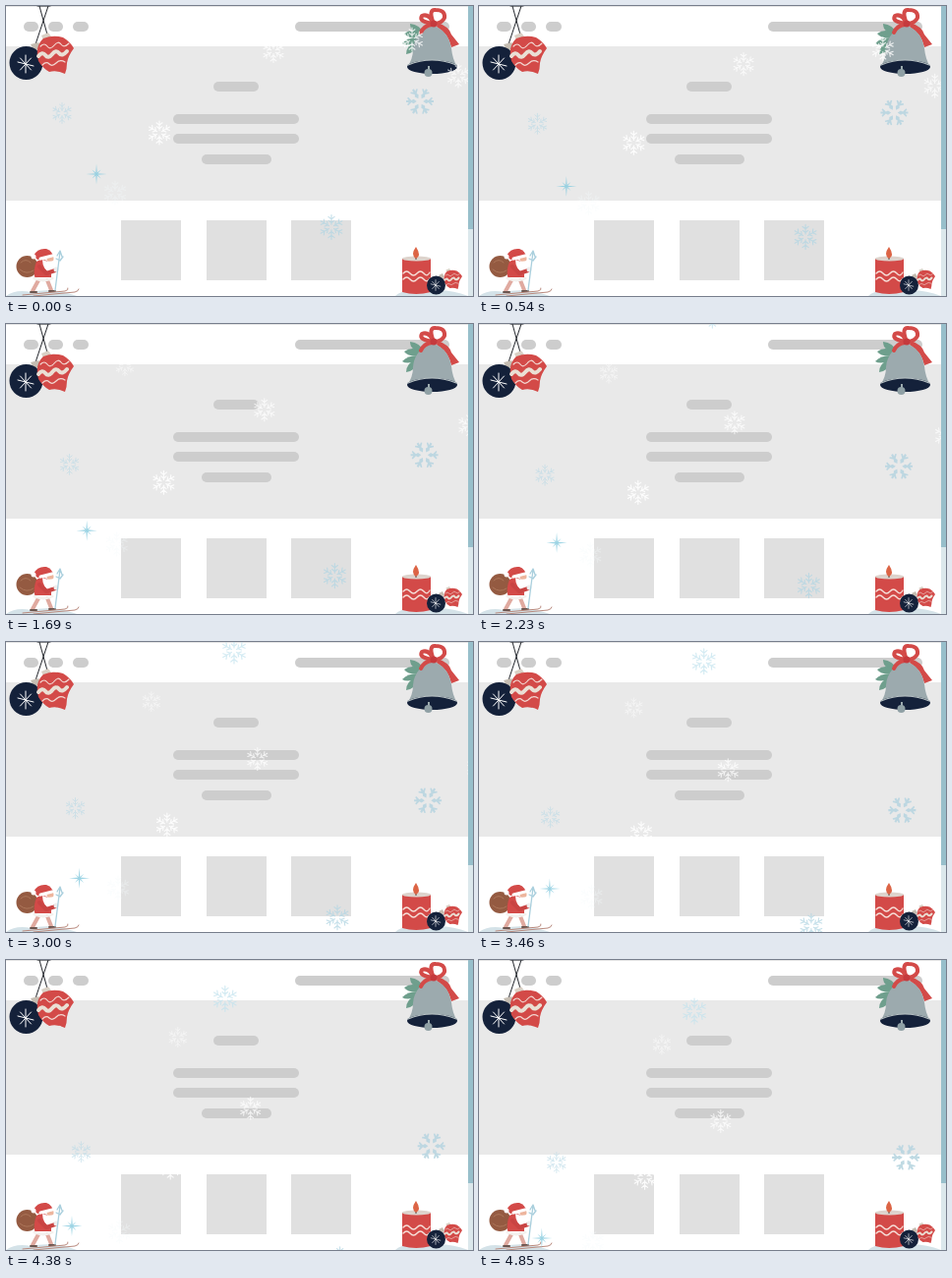
Write an HTML page that moves like this. It is 475 by 295 pixels and loops after 4.92 s.

```html
<!DOCTYPE html>
<html lang="en">
<head>
<meta charset="utf-8">
<title>Winter page</title>
<style>
  html, body { margin: 0; width: 100%; height: 100%; overflow: hidden; background: #fff; }
  svg { display: block; width: 475px; height: 295px; }
  .line { fill: none; stroke-linecap: round; stroke-linejoin: round; }
</style>
</head>
<body>
<svg viewBox="0 0 475 295">
  <defs>
    <path id="arm" d="M0-3V-13M0-4.500l-2.800-2.400M0-4.500l2.800-2.400M0-8.500l-3.200-2.600M0-8.500l3.200-2.600"/>
    <g id="flake" class="line" stroke="currentColor" stroke-width="1.2">
      <use href="#arm"/>
      <use href="#arm" transform="rotate(60)"/>
      <use href="#arm" transform="rotate(120)"/>
      <use href="#arm" transform="rotate(180)"/>
      <use href="#arm" transform="rotate(240)"/>
      <use href="#arm" transform="rotate(300)"/>
    </g>
    <path id="petal" d="M0-3L2-6 1-8 4-11 3-12 1-10.500V-13H-1V-10.500L-3-12-4-11-1-8-2-6Z"/>
    <g id="crystal" fill="currentColor" transform="rotate(30)">
      <use href="#petal"/>
      <use href="#petal" transform="rotate(60)"/>
      <use href="#petal" transform="rotate(120)"/>
      <use href="#petal" transform="rotate(180)"/>
      <use href="#petal" transform="rotate(240)"/>
      <use href="#petal" transform="rotate(300)"/>
    </g>
    <g id="star" fill="currentColor">
      <path d="M0-13L1-1 13 0 1 1 0 13-1 1-13 0-1-1Z"/>
      <path d="M0-8L.8-.8 8 0 .8.8 0 8-.8.8-8 0-.8-.8Z" transform="rotate(45)"/>
    </g>
    <path id="burst" class="line" stroke="#fff" d="M0-9V9M-8-2L8 2M-5.500-6L5.500 6M5.500-6L-5.500 6"/>
    <g id="bauble">
      <path d="M36 30l7-3 3 4-8 4z" fill="#d9d0c5"/>
      <path d="M38 33Q48 29 58 32Q65 36 69 43Q63 51 62 58Q62 64 60 69Q52 65 44 67Q37 63 33 56Q29 41 38 33Z" fill="#d34a48"/>
      <g class="line">
        <path d="M33 51q4-5 7-1t7-1 7-1 8-2" stroke="#eadfd4" stroke-width="4"/>
        <path d="M35 41q4-4 7 0t7-1 7-1 8-1M37 60q4-4 7-1t7-1 9-1" stroke="#f3d8d2" stroke-width="1.200"/>
      </g>
    </g>
  </defs>

  <!-- page wireframe -->
  <rect width="470" height="1" fill="#e6e6e6"/>
  <rect y="41" width="470" height="157" fill="#e9e9e9"/>
  <g fill="#cdcdcd">
    <rect x="18" y="16" width="15" height="10" rx="5"/>
    <rect x="43" y="16" width="15" height="10" rx="5"/>
    <rect x="68" y="16" width="16" height="10" rx="5"/>
    <rect x="294" y="16" width="157" height="10" rx="5"/>
    <rect x="211" y="77" width="46" height="10" rx="5"/>
    <rect x="170" y="110" width="128" height="10" rx="5"/>
    <rect x="170" y="130" width="128" height="10" rx="5"/>
    <rect x="199" y="151" width="71" height="10" rx="5"/>
  </g>
  <g fill="#e0e0e0">
    <rect x="117" y="218" width="61" height="61"/>
    <rect x="204" y="218" width="61" height="61"/>
    <rect x="290" y="218" width="61" height="61"/>
  </g>

  <!-- hanging baubles -->
  <path class="line" d="M32 0H45M34 0L42 29M43 0L30 39" stroke="#25282e"/>
  <path d="M25 39l8-2 3 5-7 4z" fill="#c5bdb2"/>
  <circle cx="20.500" cy="58" r="17" fill="#14213a"/>
  <use href="#burst" x="20" y="59"/>
  <use href="#bauble"/>

  <!-- bell -->
  <g fill="#6f9f8d">
    <path d="M424 30Q411 27 411 18Q421 19 425 28Z"/>
    <path d="M424 32Q409 34 405 28Q413 22 424 28Z"/>
    <path d="M422 36Q408 42 403 38Q409 31 422 32Z"/>
    <path d="M420 37Q416 48 407 49Q407 40 419 34Z"/>
  </g>
  <path d="M439 17Q451 21 453 29L461 39 453 42Q450 28 438 21Z" fill="#d34a48"/>
  <path d="M434 20C423 23 415 31 414 44Q414 54 408 62H459Q454 54 453 43C451 31 445 23 434 20Z" fill="#9caaae"/>
  <ellipse cx="433.500" cy="62" rx="25.500" ry="7" fill="#14213a"/>
  <path class="line" d="M409 60Q433 50 458 60" stroke="#b8c2c4" stroke-width="1.200"/>
  <path d="M430 61V66" stroke="#9caaae" stroke-width="2"/>
  <circle cx="429.500" cy="68" r="4" fill="#8fa0a5"/>
  <g class="line" stroke="#d34a48" stroke-width="4">
    <path d="M435 18Q419 16 423 10Q430 7 435 18Q429 3 437 4Q447 4 446 12Q444 17 436 18"/>
    <path d="M433 19Q425 20 422 27"/>
  </g>
  <circle cx="435" cy="18" r="3.500" fill="#c53a3d"/>

  <!-- skier -->
  <path d="M0 295Q10 288 25 291Q48 286 72 295Z" fill="#d4e2e8"/>
  <circle cx="21.500" cy="265" r="11" fill="#945a41"/>
  <path class="line" d="M15 261q5-5 10 0M14 268q7 6 14 1" stroke="#ad765a"/>
  <path class="line" d="M33 279L27 290M42 279L46 289" stroke="#e0aaa0" stroke-width="4"/>
  <path d="M31 260Q38 255 46 262L46 276 29 276Q28 267 31 260Z" fill="#d34a48"/>
  <path class="line" d="M29 277Q38 281 47 277" stroke="#f4f1ee" stroke-width="3"/>
  <path class="line" d="M25 291h6M44 290h6" stroke="#6b5650" stroke-width="2"/>
  <path d="M28 254Q32 246 41 247Q47 249 48 255L32 258Z" fill="#d34a48"/>
  <circle cx="28" cy="255" r="2.500" fill="#fff"/>
  <circle cx="45" cy="257" r="3.500" fill="#edb59d"/>
  <path class="line" d="M35 257L47 254" stroke="#fff" stroke-width="3"/>
  <path d="M37 258Q42 261 49 259Q53 267 47 273Q37 269 37 258Z" fill="#fff"/>
  <path class="line" d="M34 265L41 272 50 269" stroke="#c94443" stroke-width="4"/>
  <circle cx="51" cy="268" r="2.500" fill="#eee"/>
  <path class="line" d="M55 250L50 289M52 254l3-5 2 6M51 257l4 2 3-4" stroke="#a9cfdd" stroke-width="1.300"/>
  <path class="line" d="M17 294L60 290Q64 289 63 287M28 295L70 291Q74 290 74 288" stroke="#b98a7e"/>

  <!-- candle and baubles -->
  <path d="M396 295Q403 288 420 291Q448 286 470 295Z" fill="#d4e2e8"/>
  <path d="M403 257V291Q417 295 432 291V257Z" fill="#d34a48"/>
  <ellipse cx="417.500" cy="257" rx="14.500" ry="2.500" fill="#ddd3cc"/>
  <path d="M417 258V253" stroke="#444"/>
  <path d="M417 245Q423 254 417 257Q411 253 417 245Z" fill="#dc6445"/>
  <g class="line" stroke="#f6dfd8" stroke-width="1.300">
    <path id="wave" d="M404 272q3.500-4 7 0t7 0 7 0 6-1"/>
    <use href="#wave" y="6"/>
  </g>
  <use href="#bauble" transform="translate(429.500 253.500) scale(.5)"/>
  <path d="M440 274l4-2 2 4-4 2z" fill="#c5bdb2"/>
  <circle cx="437.500" cy="284" r="9.500" fill="#14213a"/>
  <use href="#burst" transform="translate(437 284) scale(.6)"/>

  <g id="snow"></g>

  <!-- scrollbar -->
  <rect x="470" width="5" height="295" fill="#dce8ec"/>
  <rect x="470" width="5" height="227" fill="#98bfcb"/>
</svg>
<script>
  const LOOP = 4920, STEP = 77;
  // x, y at start; vx, vy in px per second; radius; opacity; visible span in seconds
  const flakes = [
    { x: 272, y: 46, vx: -5.4, vy: 24.3, r: 11.5, alpha: .75 },
    { x: 156, y: 129, vx: 2.6, vy: 19, r: 12, alpha: .9 },
    { x: 460, y: 71, vx: 6.7, vy: 19, r: 12, alpha: .7 },
    { x: 413, y: 34, vx: -4, vy: 18, r: 12, alpha: .8, to: 1.1 },
    { x: 86, y: 19.5, vx: 20.6, vy: 13.7, r: 10, alpha: .5, from: 1 },
    { x: 111, y: 190, vx: 1, vy: 20, r: 12, alpha: .35, color: '#f4fafc' },
    { x: 421, y: 97, vx: 2.7, vy: 21.4, r: 14, alpha: .9, color: '#b9d6e1', shape: 'crystal' },
    { x: 57, y: 109, vx: 4.5, vy: 20, r: 10.5, alpha: .6, color: '#b9d9e6' },
    { x: 331, y: 225, vx: 2, vy: 18.4, r: 12.5, alpha: .75, color: '#b3d6e3' },
    { x: 253, y: -61, vx: -7, vy: 23.3, r: 13, alpha: .7, color: '#c3e3ee' },
    { x: 92, y: 171, vx: -5.8, vy: 23.1, r: 10.5, alpha: .85, color: '#8ccde0', shape: 'star' }
  ];
  const snow = document.getElementById('snow');

  for (const f of flakes) {
    f.el = document.createElementNS('http://www.w3.org/2000/svg', 'use');
    f.el.setAttribute('href', '#' + (f.shape || 'flake'));
    f.el.style.color = f.color || '#fff';
    f.el.style.opacity = f.alpha;
    snow.append(f.el);
  }

  function draw(now) {
    const tick = Math.min(63, Math.floor((now % LOOP + 5) / STEP));
    const t = tick * STEP / 1000;
    for (const { el, x, y, vx, vy, r, from = 0, to = 9 } of flakes) {
      el.setAttribute('transform', `translate(${x + vx * t} ${y + vy * t}) scale(${r / 13})`);
      el.setAttribute('visibility', t >= from && t < to ? 'visible' : 'hidden');
    }
  }

  const start = performance.now();
  function loop() {
    draw(performance.now() - start);
    requestAnimationFrame(loop);
  }
  loop();
</script>
</body>
</html>
```
